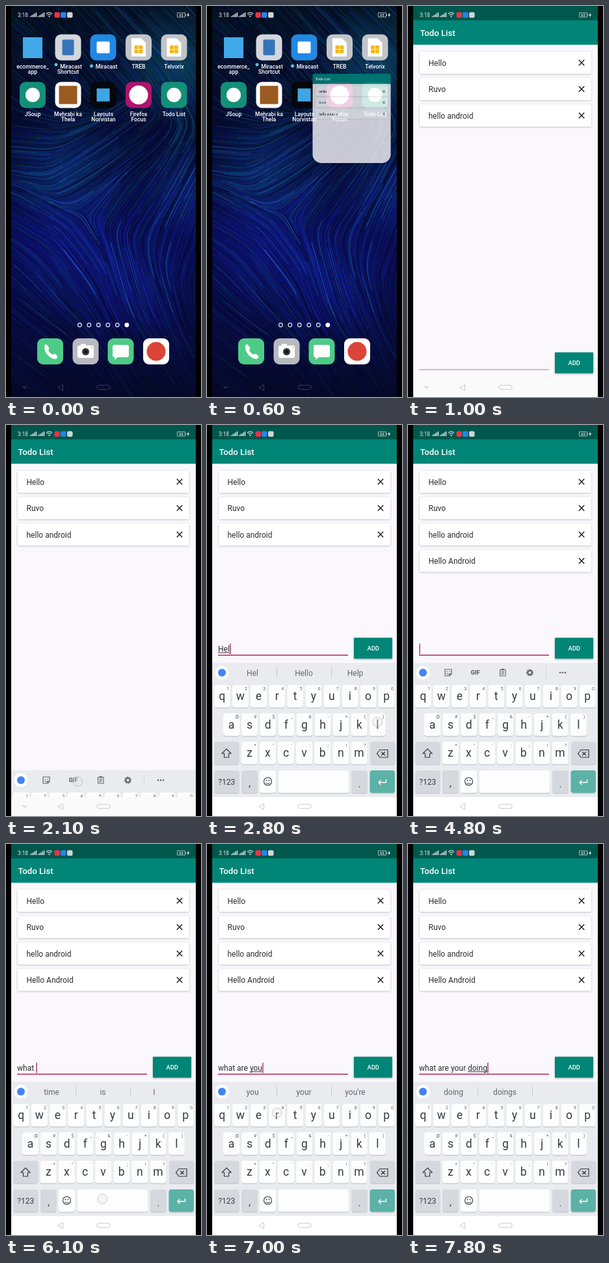
Animation of 300x600 px, one loop 8000 ms. Source, as an HTML page with a canvas:

```html
<!DOCTYPE html>
<html lang="en">
<head>
<meta charset="utf-8">
<title>Todo List</title>
<style>
  html, body { margin: 0; width: 300px; height: 600px; overflow: hidden; background: #000; }
  canvas { display: block; }
</style>
</head>
<body>
<canvas id="stage" width="300" height="600"></canvas>
<script>
const LOOP = 8000;
const newCanvas = () => Object.assign(document.createElement('canvas'), { width: 300, height: 600 });
const screen = document.getElementById('stage').getContext('2d');
const layer = newCanvas().getContext('2d');
let c = screen;

// Drawing helpers
function box(x, y, w, h, r, color) {
  c.beginPath();
  c.roundRect(x, y, w, h, r);
  c.fillStyle = color;
  c.fill();
}
function circle(x, y, r, color) {
  c.beginPath();
  c.arc(x, y, r, 0, 7);
  c.fillStyle = color;
  c.fill();
}
function line(d, color, width = 1) {
  c.strokeStyle = color;
  c.lineWidth = width;
  c.stroke(new Path2D(d));
}
function shape(d, color) {
  c.fillStyle = color;
  c.fill(new Path2D(d));
}
// y is the middle of the capital letters
function text(s, x, y, size, color, align = 'left', weight = 400) {
  c.font = `${weight} ${size}px Roboto, sans-serif`;
  c.textAlign = align;
  c.fillStyle = color;
  c.fillText(s, x, y + size * 0.355);
}

// Wallpaper: strands that follow a field blended from a few directions
const winds = [ // x, y, degrees
  [30, 110, 40], [120, 80, 50], [240, 40, 45], [275, 130, 60], [30, 215, 5], [105, 250, -32],
  [195, 215, -35], [275, 240, -62], [200, 310, -55], [40, 320, 30], [110, 390, 52],
  [185, 400, 75], [225, 430, 70], [275, 380, -70], [60, 520, 35], [210, 530, 55],
];
const glows = [ // x, y, radius, hue
  [95, 255, 75, 214], [205, 425, 70, 234], [265, 90, 75, 194], [285, 290, 60, 224], [90, 380, 80, 236],
];
function windAt(x, y) {
  let u = 0, v = 0;
  for (const [wx, wy, degrees] of winds) {
    const weight = 1 / ((x - wx) ** 2 + (y - wy) ** 2 + 300) ** 1.5;
    u += weight * Math.cos(degrees * Math.PI / 90);
    v += weight * Math.sin(degrees * Math.PI / 90);
  }
  return Math.atan2(v, u) / 2;
}
function paintWallpaper() {
  const canvas = newCanvas();
  c = canvas.getContext('2d');
  let seed = 11;
  const rand = () => (seed = (seed * 16807) % 2147483647) / 2147483647;
  const sky = c.createLinearGradient(0, 0, 0, 600);
  [[0, '#04101f'], [0.3, '#060a30'], [0.55, '#090c52'], [0.8, '#080b44'], [1, '#050824']]
    .forEach(([at, color]) => sky.addColorStop(at, color));
  box(0, 0, 300, 600, 0, sky);
  for (const [x, y, r, hue] of glows) {
    const halo = c.createRadialGradient(x, y, 0, x, y, r * 1.3);
    halo.addColorStop(0, `hsla(${hue}, 80%, 32%, .5)`);
    halo.addColorStop(1, `hsla(${hue}, 80%, 32%, 0)`);
    box(0, 0, 300, 600, 0, halo);
  }
  for (let i = 0; i < 2200; i++) {
    const x0 = rand() * 300, y0 = rand() * 600;
    const glow = Math.min(1, glows.reduce((sum, [x, y, r]) =>
      sum + Math.exp(-((x0 - x) ** 2 + (y0 - y) ** 2) / r ** 2), 0));
    const teal = rand() < (y0 < 300 ? 0.55 : 0.12);
    const hue = teal ? 195 + rand() * 15 : 224 + rand() * 18;
    const light = 3 + rand() * (20 + 32 * glow);
    const half = 8 + rand() * 14;
    c.beginPath();
    for (const way of [1, -1]) {
      let x = x0, y = y0, heading = windAt(x, y) + (way < 0 ? Math.PI : 0);
      c.moveTo(x, y);
      for (let n = 0; n < half; n++) {
        let angle = windAt(x, y);
        if (Math.cos(angle - heading) < 0) angle += Math.PI;
        heading = angle;
        c.lineTo(x += 3 * Math.cos(angle), y += 3 * Math.sin(angle));
      }
    }
    c.strokeStyle = `hsla(${hue}, 78%, ${light}%, ${y0 > 510 ? 0.35 : 0.6})`;
    c.lineWidth = 0.5 + rand() * 0.6;
    c.stroke();
  }
  c = screen;
  return canvas;
}
const wallpaper = paintWallpaper();

function statusBar() {
  text('3:18', 18, 14, 8.3, '#e6ecee');
  for (const x of [37, 49])
    for (let i = 0; i < 5; i++) box(x + i * 2.2, 15.5 - i * 1.4, 1.4, 1.5 + i * 1.4, 0, '#dfe6ea');
  line('M62 12 Q66.5 8 71 12 M63.8 14 Q66.5 11.5 69.2 14', '#e6ecee', 1.1);
  circle(66.5, 16, 1.1, '#e6ecee');
  box(74.5, 9.5, 8.5, 8.5, 2, '#e6334a');
  box(84, 9.5, 8.5, 8.5, 2, '#2585e8');
  box(94, 9.5, 8.5, 8.5, 2, '#cfd4d8');
  line('M263.5 10.5 H275.5 V17 H263.5 Z M276.5 12.5 V15', '#b4c0c6', 0.9);
  text('65', 269.5, 13.8, 5.5, '#e6ecee', 'center', 500);
  shape('M281 10 L278 14.4 H280 L279.4 17.6 L282.3 13.2 H280.4 Z', '#e6ecee');
}

function navBar(color, chevron) {
  if (chevron) line('M25.5 583.5 L28.5 586.5 L31.5 583.5', color, 1.1);
  line('M87.5 581 V590 L79.5 585.5 Z', color);
  line('M143 582 H157 a3.2 3.2 0 0 1 0 6.4 H143 a3.2 3.2 0 0 1 0 -6.4 Z', color);
}

// Home screen
const tile = (x, y, color) => box(x - 20, y - 20, 40, 40, 9, color);
const label = (x, y, ...rows) =>
  rows.forEach((row, i) => text(row, x, y + i * 8.7, 8.6, '#fff', 'center', 500));
function simCard(x, y) {
  tile(x, y, '#c3c4c8');
  shape(`M${x - 11} ${y - 14} h15 l7 7 v21 h-22 Z`, '#fff');
  box(x - 6.5, y - 3, 13, 12, 1.5, '#f5b718');
  line(`M${x - 6.5} ${y + 3} h13 M${x} ${y - 3} v12`, '#fff', 0.8);
}
function robotTile(x, y) {
  tile(x, y, '#149078');
  circle(x, y, 11, '#fff');
}

function drawHome() {
  c.drawImage(wallpaper, 0, 0);
  const cols = [41, 95.5, 149.5, 204, 258.5], top = 63.5, low = 136.5;
  box(26, 48, 30, 32, 0, '#41a9ea');
  tile(cols[1], top, '#d3d6dd');
  box(86.5, 51.5, 18, 24, 2, '#3574b8');
  tile(cols[2], top, '#2189e4');
  box(139.5, 54.5, 20, 18, 2, '#fff');
  simCard(cols[3], top);
  simCard(cols[4], top);
  robotTile(cols[0], low);
  tile(cols[1], low, '#fff');
  box(81.5, 122.5, 28, 28, 0, '#9a5a20');
  tile(cols[2], low, '#05070a');
  box(139.5, 126.5, 20, 20, 0, '#3fa5e4');
  tile(cols[3], low, '#b0146e');
  circle(cols[3], low, 14.5, '#fff');
  robotTile(cols[4], low);

  circle(77, 90, 2.5, '#58c3dd');
  circle(131.5, 92, 2.5, '#58c3dd');
  label(41, 92.5, 'ecommerce_', 'app');
  label(100, 92.5, 'Miracast');
  label(95.5, 101.2, 'Shortcut');
  label(154.5, 92.5, 'Miracast');
  label(204, 92.5, 'TREB');
  label(258.5, 92.5, 'Telvorix');
  label(41, 165.5, 'JSoup');
  label(95.5, 165.5, 'Mehrabi ka', 'Thela');
  label(150, 165.5, 'Layouts', 'Norvistan');
  label(204, 165.5, 'Firefox', 'Focus');
  label(258.5, 165.5, 'Todo List');

  for (let i = 0; i < 6; i++) {
    const x = 113.3 + i * 14.5;
    if (i === 5) circle(x, 489.5, 3.4, '#fff');
    else line(`M${x - 2.8} 489.5 a2.8 2.8 0 1 0 5.6 0 a2.8 2.8 0 1 0 -5.6 0`, '#e6e9f5', 1.2);
  }
  tile(68, 530, '#4ecb87');
  shape('M59 521 q2-3 4-1 l3 4 q1 2-1 4 q2 5 7 7 q2-2 4-1 l3 3 q1 2-1 4 q-4 2-10-2 q-10-7-9-18 Z', '#fff');
  tile(122.5, 530, '#b9bac1');
  box(110, 521, 25, 19, 3, '#fff');
  box(115, 518.5, 8, 4, 1, '#fff');
  circle(122.5, 530.5, 5.5, '#34363d');
  circle(122.5, 530.5, 2.5, '#11131a');
  circle(132, 524, 1.1, '#f0a030');
  tile(176.5, 530, '#4ecb87');
  shape('M167 520 h19 q3 0 3 3 v13 q0 3-3 3 h-14 l-5 4 v-4 q-3 0-3-3 v-13 q0-3 3-3 Z', '#fff');
  tile(231, 530, '#fff');
  circle(231, 530, 14.5, '#dc4437');
  statusBar();
  navBar('#343d6c', true);
}

// Keyboard
const rows = [
  { keys: 'qwertyuiop', hints: '1234567890', x: 23.3, y: 416.5 },
  { keys: 'asdfghjkl', hints: '@#$_&-+()', x: 37.5, y: 460 },
  { keys: 'zxcvbnm', hints: '*"\':;!?', x: 65.3, y: 503.5 },
];
const PITCH = 28.1;
const keyAt = { '^': [30, 503], ' ': [148.5, 544.5], '+': [256, 343] };
for (const { keys, x, y } of rows)
  [...keys].forEach((key, i) => keyAt[key] = [x + i * PITCH, y - 4]);

const suggestions = {
  H: 'H Hi He', He: 'He Hey Hello', Hel: 'Hel Hello Help', Hell: 'Hell Hello Hells',
  Hello: 'Hello Hellos Hello!', 'Hello ': 'I how there',
  A: 'A And Are', An: 'An And Any', And: 'And Android Andy', Andr: 'Andr Android Andrew',
  Andro: 'Andro Android Androids', Androi: 'Androi Android Androids', Android: 'Android Androids phone',
  w: 'w we with', wh: 'wh what when', wha: 'wha what whatever', what: "what what's whatever",
  'what ': 'time is I', a: 'a are and', ar: 'ar are art', are: 'are area aren’t', 'are ': 'you the we',
  y: 'y you yes', yo: 'yo you your', you: "you your you're", your: 'your yours you', 'your ': 'phone name plans',
  d: 'd do day', do: 'do don’t done', doi: 'doi doing dois', doin: 'doin doing doings', doing: 'doing doings',
};

function keyCap(x, y, w, color = '#fdfdfe') {
  box(x, y + 1, w, 35, 4, '#c9ccd3');
  box(x, y, w, 34.5, 4, color);
}
function drawKeyboard({ value, shift }) {
  const ink = '#363b42', soft = '#63676d', dark = '#d5d9de';
  box(8, 365, 284, 206, 0, '#e9ebef');
  circle(23, 380, 10.5, '#fff');
  circle(23, 380, 6, '#4285f4');
  const words = suggestions[(value.match(/\S+ ?$/) || [''])[0]];
  if (words) {
    words.split(' ').forEach((word, i) => text(word, 70 + i * 79, 381, 12, soft, 'center'));
    line('M107.5 372 V388 M191.5 372 V388', '#c6c9ce');
  } else {
    line('M57 375 H67 V382 L64 385 H57 Z M67 382 H64 V385 M59.5 381 Q62 384 64 381', soft, 1.2);
    circle(60.2, 378.5, 0.8, soft);
    circle(64, 378.5, 0.8, soft);
    text('GIF', 103.5, 380, 9.2, soft, 'center', 900);
    line('M141.5 375.5 H150 V385 H141.5 Z M143.5 378.5 H148 M143.5 380.5 H148 M143.5 382.5 H147', soft, 1.1);
    box(143.5, 374, 4.5, 2.5, 1, soft);
    c.setLineDash([2, 1.6]);
    line('M182.7 380 a4.8 4.8 0 1 0 9.6 0 a4.8 4.8 0 1 0 -9.6 0', soft, 1.5);
    c.setLineDash([]);
    line('M184.3 380 a3.2 3.2 0 1 0 6.4 0 a3.2 3.2 0 1 0 -6.4 0', soft, 2.2);
    line('M212.5 372 V388', '#d3d6da');
    for (const x of [234, 238, 242]) circle(x, 380, 1.3, soft);
  }
  for (const { keys, hints, x, y } of rows)
    [...keys].forEach((key, i) => {
      const mid = x + i * PITCH;
      keyCap(mid - 12.5, y - 17.5, 25);
      text(shift ? key.toUpperCase() : key, mid, y - 0.5, 17.5, ink, 'center');
      text(hints[i], mid + 8.7, y - 12.2, 7.2, soft, 'center');
    });
  keyCap(11, 486, 38.5, dark);
  const arrow = 'M30 497 L37 504 H33.5 V510 H26.5 V504 H23 Z';
  if (shift) shape(arrow, ink);
  line(arrow, ink, 1.2);
  keyCap(251, 486, 38.5, dark);
  line('M266 498.5 H278 V510 H266 L261.5 504.2 Z M268 501.5 L274 507 M274 501.5 L268 507', ink, 1.2);
  keyCap(11, 530, 38.5, dark);
  text('?123', 30.2, 548, 12, ink, 'center');
  keyCap(53, 530, 25, dark);
  text(',', 65.5, 550, 15, ink, 'center');
  keyCap(81, 530, 25);
  line('M87.5 547 a6 6 0 1 0 12 0 a6 6 0 1 0 -12 0 M90.5 549 Q93.5 552.5 96.5 549', ink, 1.1);
  circle(91.5, 545.5, 0.9, ink);
  circle(95.5, 545.5, 0.9, ink);
  keyCap(109.5, 530, 108.5);
  keyCap(222, 530, 25, dark);
  text('.', 234.5, 551, 15, ink, 'center');
  keyCap(250.5, 530, 38.5, '#5cb2a6');
  line('M275.5 544 V548.5 H264 M267.5 545 L264 548.5 L267.5 552', '#fff', 1.4);
}

// Todo app
function drawApp(state) {
  const { t, items, value } = state;
  const focused = t >= 2180;
  const rise = focused ? 205 : 0;
  box(8, 0, 284, 600, 0, '#faf8fc');
  box(8, 0, 284, 22, 0, '#00574b');
  box(8, 22, 284, 37.6, 0, '#008577');
  statusBar();
  text('Todo List', 18.5, 41.3, 13.2, '#fff', 'left', 500);
  items.forEach((item, i) => {
    const y = 70 + i * 40.5;
    c.shadowColor = 'rgba(0,0,0,.25)';
    c.shadowBlur = 3;
    c.shadowOffsetY = 0.8;
    box(18, y, 264, 34, 1.5, '#fff');
    c.shadowColor = 'transparent';
    text(item, 31.5, y + 17.5, 12, '#2c2c2c');
    line(`M262.8 ${y + 12.8} l8.4 8.4 m0 -8.4 l-8.4 8.4`, '#151515', 1.35);
  });

  if (focused) {
    text(value, 17, 344, 12, '#2c2c2c');
    const end = 17 + c.measureText(value).width;
    const word = value.match(/\S*$/)[0];
    if (word) line(`M${end - c.measureText(word).width} 349.5 H${end}`, '#333', 0.9);
    line(`M${end + 1} 335.5 V351.5`, '#b3285d', 1.4);
    line('M17 353.2 H217', '#b3285d', 1.5);
  } else line('M17 558 H217', '#8c8a8e');
  c.shadowColor = 'rgba(0,0,0,.35)';
  c.shadowBlur = 3;
  c.shadowOffsetY = 1;
  box(226, 531.5 - rise, 59, 32, 1, t > 4600 && t < 4760 ? '#1b9485' : '#008577');
  c.shadowColor = 'transparent';
  text('ADD', 255.7, 548 - rise, 9.4, '#fff', 'center', 500);

  if (t >= 2080) {
    const slide = 1 - Math.min(1, (t - 2080) / 200);
    c.save();
    c.translate(0, 206 * slide * slide);
    drawKeyboard(state);
    c.restore();
  }
  box(8, 571, 284, 29, 0, focused ? '#fff' : '#fafafa');
  navBar('#cbcbcf', !focused);
}

// Script of taps: ^ is shift, + is the ADD button
const type = (start, step, keys) => [...keys].map((key, i) => ({ at: start + i * step, key }));
const taps = [
  { at: 420, spot: [259, 136] },
  { at: 2060, spot: [110, 547] },
  ...type(2340, 140, '^Hel'),
  ...type(2960, 145, 'lo ^Android'),
  ...type(4680, 0, '+'),
  ...type(5400, 165, 'what '),
  ...type(6250, 110, 'are your '),
  ...type(7250, 110, 'doing'),
];

function stateAt(t) {
  const state = { t, items: ['Hello', 'Ruvo', 'hello android'], value: '', shift: false };
  for (const { at, key } of taps) {
    if (at > t || !key) continue;
    state.shift = key === '^';
    if (key === '+') {
      state.items.push(state.value);
      state.value = '';
    } else if (!state.shift) state.value += key;
  }
  return state;
}

function drawTouch(t) {
  const tap = taps.find(({ at }) => t >= at - 50 && t < at + 70);
  if (!tap) return;
  const [x, y] = tap.spot || keyAt[tap.key.toLowerCase()];
  circle(x, y, 7.5, 'rgba(225,225,228,.35)');
  line(`M${x - 7.5} ${y} a7.5 7.5 0 1 0 15 0 a7.5 7.5 0 1 0 -15 0`, 'rgba(150,150,155,.45)');
}

// The app window grows out of its icon
function drawOpening(state) {
  const p = 1 - (1 - (state.t - 500) / 400) ** 1.4, q = p ** 1.5;
  const mix = (a, b, k) => a + (b - a) * k;
  const left = mix(240, 8, p), width = mix(278, 292, p) - left;
  const scale = width / 284;
  const top = mix(117, 0, q) + 22 * scale;
  const height = mix(155, 600, q) - top;
  const corner = 21 * (1 - p);
  c = layer;
  drawApp(state);
  c = screen;
  c.save();
  c.beginPath();
  c.roundRect(left, top, width, height, [2, 2, corner, corner]);
  c.clip();
  c.globalAlpha = Math.min(1, 0.4 + 1.2 * p);
  c.drawImage(layer.canvas, 8, 22, 284, height / scale, left, top, width, height);
  c.restore();
}

function render() {
  const t = performance.now() % LOOP;
  const state = stateAt(t);
  if (t < 900) {
    drawHome();
    if (t > 500) drawOpening(state);
  } else drawApp(state);
  drawTouch(t);
  box(0, 0, 8, 600, 0, '#000');
  box(292, 0, 8, 600, 0, '#000');
  requestAnimationFrame(render);
}
render();
</script>
</body>
</html>
```
